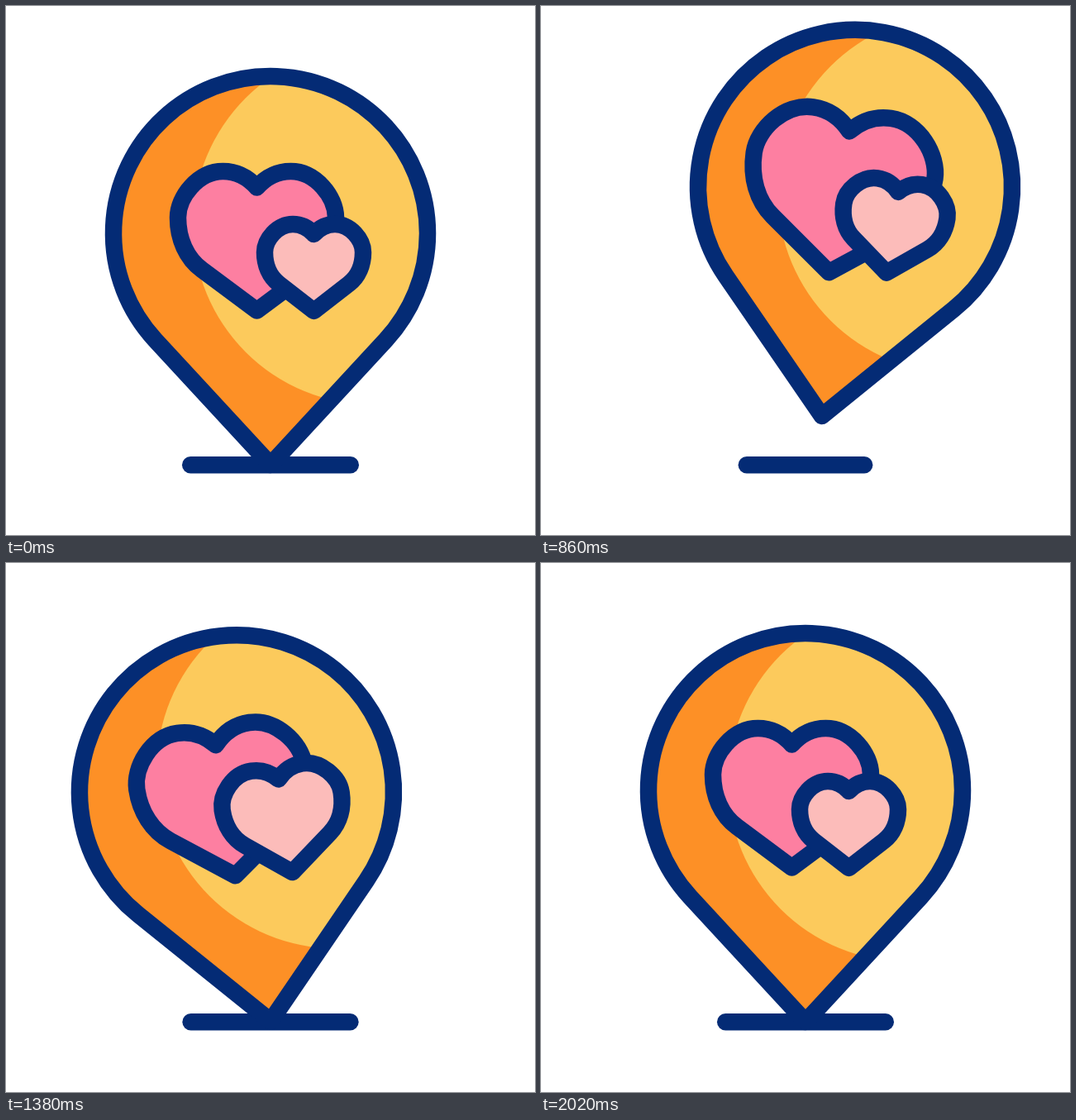
These frames come from a looping animation (640 by 640 pixels, 2400 ms). An HTML page with a canvas:

```html
<!DOCTYPE html>
<html lang="en">
<head>
<meta charset="utf-8">
<title>Location pin</title>
<style>
  html, body { margin: 0; width: 100%; height: 100%; overflow: hidden; background: #fff; }
  canvas { display: block; width: 100%; height: 100%; }
</style>
</head>
<body>
<canvas id="stage" width="640" height="640"></canvas>
<script>
const ctx = document.getElementById('stage').getContext('2d');
const LOOP = 2400;
const NAVY = '#042b75', ORANGE = '#fd9026', YELLOW = '#fcca5c';
const PINK = '#fd7fa1', BLUSH = '#fcbcba', SPARK = '#ffcb50';
const STROKE = 20.5;
const TIP = { x: 320, y: 555 };
const HEAD = { x: 320, y: 275, r: 190 };

// Keyframe tracks: [time, value] pairs joined by smooth easing
const lift = [[200, 0], [1100, 1], [1400, 0]];
const tilt = [[200, 0], [1100, 10], [1400, -8.7], [1700, 5], [2010, 0]];
const beat = (start, peak) =>
  [0, 1, 2, 3, 4].map(i => [start + i * 400, i % 2 ? peak : 1]);
const bigBeat = beat(400, 1.168);
const smallBeat = beat(200, 1.225);
const sparkHead = [[1400, 0], [1600, 1]];
const sparkTail = [[1500, 0], [1700, 1]];

function valueAt(track, t) {
  if (t <= track[0][0]) return track[0][1];
  for (let i = 1; i < track.length; i++) {
    const [t0, v0] = track[i - 1], [t1, v1] = track[i];
    if (t < t1) {
      const u = (t - t0) / (t1 - t0);
      return v0 + (v1 - v0) * u * u * (3 - 2 * u);
    }
  }
  return track[track.length - 1][1];
}

function pinPath() {
  const spread = Math.acos(HEAD.r / (TIP.y - HEAD.y));
  const path = new Path2D();
  path.moveTo(TIP.x, TIP.y);
  path.arc(HEAD.x, HEAD.y, HEAD.r, Math.PI / 2 + spread, Math.PI * 2.5 - spread);
  path.closePath();
  return path;
}

// Hearts are drawn around their own centre and mirrored from half an outline
function heartPath(s) {
  const path = new Path2D();
  const { notch, top, side, lobe, low, tip } = s;
  const [cx, cy] = s.centre;
  const half = m => {
    const c = (...p) => path.bezierCurveTo(...p.map((v, i) => i % 2 ? v - cy : m * v));
    path.moveTo(0, notch - cy);
    c(lobe * 0.74, notch - (notch - top) * 0.62, lobe * 0.4 + lobe * 0.2, top, lobe, top);
  };
  const w = side, k = (w - lobe) * 0.448, midY = s.midY;
  const dx = (w - low[0]), slope = (tip - low[1]) / low[0];
  const X = (m, v) => m * v, Y = v => v - cy;
  path.moveTo(0, Y(notch));
  path.bezierCurveTo(X(-1, lobe * 0.26), Y(notch - (notch - top) * 0.62),
    X(-1, lobe * 0.61), Y(top), X(-1, lobe), Y(top));
  path.bezierCurveTo(X(-1, w - k), Y(top), X(-1, w), Y(midY - (midY - top) * 0.448), X(-1, w), Y(midY));
  path.bezierCurveTo(X(-1, w), Y(midY + (low[1] - midY) * 0.41),
    X(-1, low[0] + dx * 0.65), Y(low[1] - dx * 0.65 * slope), X(-1, low[0]), Y(low[1]));
  path.lineTo(0, Y(tip));
  path.lineTo(low[0], Y(low[1]));
  path.bezierCurveTo(low[0] + dx * 0.65, Y(low[1] - dx * 0.65 * slope),
    w, Y(midY + (low[1] - midY) * 0.41), w, Y(midY));
  path.bezierCurveTo(w, Y(midY - (midY - top) * 0.448), w - k, Y(top), lobe, Y(top));
  path.bezierCurveTo(lobe * 0.61, Y(top), lobe * 0.26, Y(notch - (notch - top) * 0.62), 0, Y(notch));
  path.closePath();
  return path;
}

const pin = pinPath();
const bigHeart = {
  centre: [303.5, 284.3], notch: 219.5, top: 200, side: 95.5, lobe: 41,
  midY: 256, low: [66.5, 319], tip: 368.5
};
const smallHeart = {
  centre: [372.5, 316.5], notch: 276, top: 264, side: 59.5, lobe: 25.5,
  midY: 298, low: [42.5, 336], tip: 369
};
for (const heart of [bigHeart, smallHeart]) heart.path = heartPath(heart);

function outline(path, color = NAVY) {
  ctx.strokeStyle = color;
  ctx.lineWidth = STROKE;
  ctx.stroke(path);
}

function line(x0, y0, x1, y1, color) {
  const path = new Path2D();
  path.moveTo(x0, y0);
  path.lineTo(x1, y1);
  outline(path, color);
}

function drawHeart(heart, scale, fill) {
  const [x, y] = heart.centre;
  const path = new Path2D();
  path.addPath(heart.path, new DOMMatrix([scale, 0, 0, scale, x, y]));
  ctx.fillStyle = fill;
  ctx.fill(path);
  outline(path);
}

function drawPin(t) {
  const up = valueAt(lift, t);
  ctx.save();
  ctx.translate(TIP.x + 24 * up, TIP.y - 71.5 * up);
  ctx.rotate(valueAt(tilt, t) * Math.PI / 180);
  ctx.translate(-TIP.x, -TIP.y);

  ctx.fillStyle = ORANGE;
  ctx.fill(pin);
  ctx.save();
  ctx.clip(pin);
  ctx.fillStyle = YELLOW;
  ctx.beginPath();
  ctx.arc(443.7, 265, 217.4, 0, Math.PI * 2);
  ctx.fill();
  ctx.restore();
  outline(pin);

  drawHeart(bigHeart, valueAt(bigBeat, t), PINK);
  drawHeart(smallHeart, valueAt(smallBeat, t), BLUSH);
  ctx.restore();
}

function drawSpark(t, x, y, dx, dy) {
  const head = valueAt(sparkHead, t), tail = valueAt(sparkTail, t);
  if (head - tail < 0.001) return;
  line(x + dx * tail, y + dy * tail, x + dx * head, y + dy * head, SPARK);
}

function draw(t) {
  ctx.fillStyle = '#fff';
  ctx.fillRect(0, 0, 640, 640);
  ctx.lineCap = ctx.lineJoin = 'round';
  drawSpark(t, 432.6, 496.6, 51.5, -63.2);
  drawSpark(t, 449.9, 528.8, 73.5, -7.4);
  const reach = 96.75 - 31 * valueAt(lift, t);
  line(320 - reach, 555.2, 320 + reach, 555.2, NAVY);
  drawPin(t);
}

function tick() {
  draw(performance.now() % LOOP);
  requestAnimationFrame(tick);
}
tick();
</script>
</body>
</html>
```
